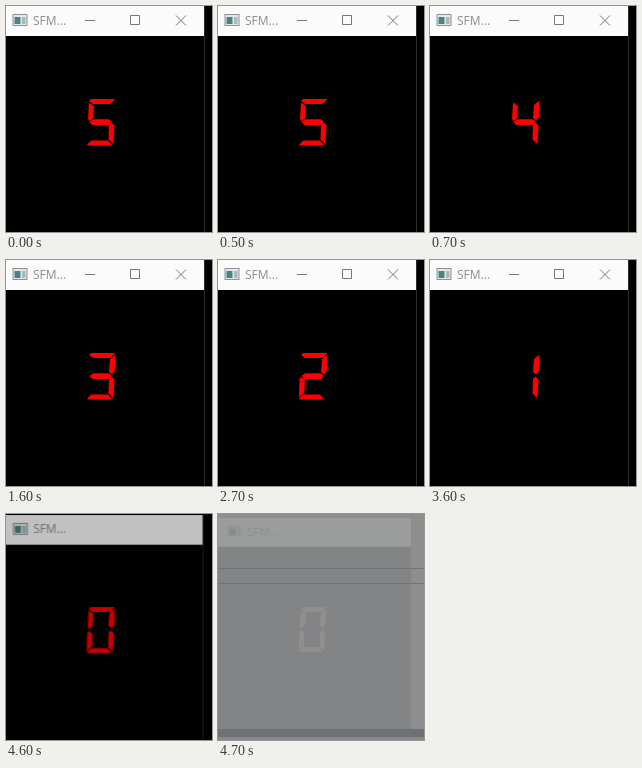
An HTML page that plays this animation: 206x226 px, repeating every 4800 ms.

```html
<!DOCTYPE html>
<html lang="en">
<head>
<meta charset="utf-8">
<title>Seven-segment countdown</title>
<style>
html, body { margin: 0; width: 100%; height: 100%; overflow: hidden; background: #000; }
svg { display: block; width: 206px; height: 226px; }
text { font: 12px "Open Sans", "Noto Sans", sans-serif; }
.led { fill: #f00; }
.led path, .buttons, .live, .ghost { animation: 4800ms step-end infinite; }
.led .ends { animation-name: ends; }
.led .ur { animation-name: upper-right; }
.led .lr { animation-name: lower-right; }
.led .ll { animation-name: lower-left; }
.led .ul { animation-name: upper-left; }
.led .mid { animation-name: middle; }
.buttons { animation-name: buttons; fill: none; stroke: #777; }
.live { animation-name: live; }
.ghost { animation-name: ghost; }

/* The digit counts down at 600, 1600, 2600, 3600 and 4600 ms. */
@keyframes ends {
  0%, 33.3333%, 95.8333% { opacity: 1; }
  12.5%, 75% { opacity: 0; }
}
@keyframes upper-right { 0% { opacity: 0; } 12.5%, 100% { opacity: 1; } }
@keyframes lower-right {
  0%, 75%, 100% { opacity: 1; }
  54.1667% { opacity: 0; }
}
@keyframes lower-left {
  0%, 75% { opacity: 0; }
  54.1667%, 95.8333% { opacity: 1; }
}
@keyframes upper-left {
  0%, 95.8333% { opacity: 1; }
  33.3333% { opacity: 0; }
}
@keyframes middle { 0% { opacity: 1; } 75%, 100% { opacity: 0; } }

/* The window dims, then gives way to its last faint trace. */
@keyframes buttons { 0% { opacity: 1; } 95.8333%, 100% { opacity: 0; } }
@keyframes live {
  0% { opacity: 1; transform: none; }
  95.8333%, 100% { opacity: .77; transform: translate(.5px, 1px) scale(.99); }
}
@keyframes ghost { 0% { opacity: 0; } 97.9167%, 100% { opacity: 1; } }
</style>
</head>
<body>
<svg viewBox="0 0 206 226">
  <defs>
    <path id="top" d="M83 95L85 93H109.5L104.5 98H87Z"/>
    <path id="ur" d="M109.5 94.5L109 110.5L106 114.5L103 112L104 99Z"/>
    <path id="lr" d="M105.5 116.5L108.5 119.5L107.5 138L102.5 133.5L103 119Z"/>
    <path id="bottom" d="M85.5 134.5H102L106.5 139.5H82L81 138.5Z"/>
    <path id="ll" d="M83.5 117L87 120L86.3 133L81 137.5L81.5 119Z"/>
    <path id="ul" d="M83 96.5L88 100L87.3 112L83.5 115.5L82 112.5Z"/>
    <path id="mid" d="M83.5 116L87 113.2H103L106 116L103 119H86.5Z"/>
  </defs>

  <rect width="206" height="226"/>

  <g class="live">
    <rect x="-3" width="201" height="30" fill="#fbfbfb"/>
    <path d="M198.5 0V230" stroke="#2b2b2b"/>
    <rect x="7" y="8.5" width="14" height="11" fill="#e4e8e8" stroke="#8c9294"/>
    <rect x="8.5" y="11" width="6" height="7" fill="#4a8480"/>
    <rect x="16" y="11" width="3.5" height="7" fill="#a9b8ba"/>
    <text x="27" y="18.5" fill="#8c8c8c">SFM...</text>
    <path class="buttons" d="M79 14.5H89M124.5 9.5H133.5V18.5H124.5ZM170 9.5L180 19.5M180 9.5L170 19.5"/>
    <g class="led">
      <path class="ends" d="M83 95L85 93H109.5L104.5 98H87Z"/>
      <path class="ur" d="M109.5 94.5L109 110.5L106 114.5L103 112L104 99Z"/>
      <path class="lr" d="M105.5 116.5L108.5 119.5L107.5 138L102.5 133.5L103 119Z"/>
      <path class="ends" d="M85.5 134.5H102L106.5 139.5H82L81 138.5Z"/>
      <path class="ll" d="M83.5 117L87 120L86.3 133L81 137.5L81.5 119Z"/>
      <path class="ul" d="M83 96.5L88 100L87.3 112L83.5 115.5L82 112.5Z"/>
      <path class="mid" d="M83.5 116L87 113.2H103L106 116L103 119H86.5Z"/>
    </g>
  </g>

  <g class="ghost">
    <rect width="206" height="226" fill="#8e8e8f"/>
    <g transform="translate(3 4) scale(.96)">
      <rect x="-3" width="201" height="30" fill="#9b9d9c"/>
      <rect x="-3" y="30" width="201" height="200" fill="#838485"/>
      <rect x="7" y="8" width="14" height="11" fill="#929695"/>
      <rect x="9" y="11" width="6" height="7" fill="#858c8a"/>
      <text x="27" y="18.5" fill="#8d908f">SFM...</text>
      <g fill="#908e8f">
        <use href="#top"/><use href="#ur"/><use href="#lr"/>
        <use href="#bottom"/><use href="#ll"/><use href="#ul"/>
      </g>
    </g>
    <path d="M0 54.5H206M0 69.5H206" stroke="#727374"/>
    <rect y="215" width="206" height="8" fill="#6d7276"/>
    <rect y="223" width="206" height="3" fill="#858788"/>
  </g>
</svg>
</body>
</html>
```
